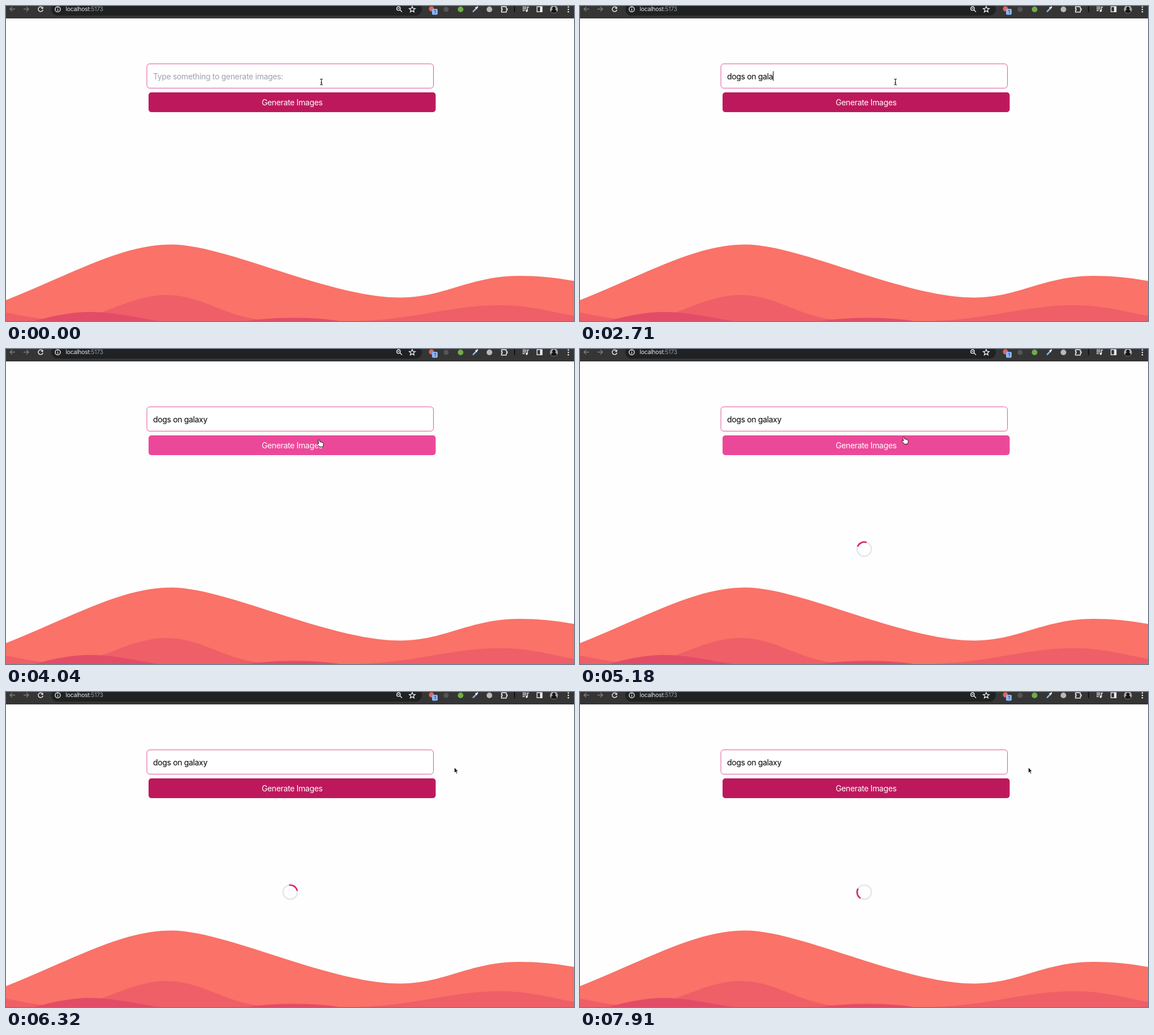
An HTML page for the animation above (8 s loop, 1004 by 558 pixels).

```html
<!DOCTYPE html>
<html lang="en">
<head>
<meta charset="utf-8">
<title>Image generator</title>
<style>
  html, body { margin: 0; width: 100%; height: 100%; overflow: hidden; background: #fefefe; }
  svg { display: block; width: 100%; height: 100%; }
  text { font: 14px Inter, "Liberation Sans", sans-serif; letter-spacing: -.34px; white-space: pre; }
  .url { font-size: 10.4px; letter-spacing: -.26px; }
  .line { fill: none; stroke: #e8eaed; stroke-width: 1.4; }
  .dim { stroke: #7c7c7c; }
</style>
</head>
<body>
<svg viewBox="0 0 1004 558">
  <rect width="1004" height="558" fill="#fefefe"/>

  <!-- browser toolbar -->
  <rect width="1004" height="22" fill="#353535"/>
  <rect x="80" y="-6" width="655" height="23" rx="11.5" fill="#202122"/>
  <path class="line dim" d="M16 5.5H7M11 1.5l-4 4 4 4M31 5.5h9M36 1.5l4 4-4 4"/>
  <path class="line" d="M64.6 3.2A4.2 4.2 0 1 0 65.3 6.5"/>
  <path d="M65.6 1v4h-4z" fill="#e8eaed"/>
  <circle class="line" cx="91.5" cy="5.8" r="4.6" stroke-width="1.2"/>
  <path class="line" d="M91.5 5.2v3.2M91.5 2.8v1.3"/>
  <text class="url" x="105.5" y="9.4" fill="#e8eaed">localhost<tspan fill="#9aa0a6">:5173</tspan></text>
  <circle class="line" cx="693.8" cy="4.4" r="3.2"/>
  <path class="line" d="M696.2 6.8l3.8 3.8M692.2 4.4h3.2"/>
  <path class="line" d="M718 .8l1.5 3.4 3.7.3-2.8 2.4.9 3.6-3.3-1.9-3.3 1.9.9-3.6-2.8-2.4 3.7-.3z" stroke-width="1.2"/>
  <circle cx="752" cy="5" r="4.5" fill="#e0645c"/>
  <rect x="753" y="5" width="10" height="10.5" rx="2" fill="#8ab4f8"/>
  <text x="758.2" y="13.4" text-anchor="middle" fill="#202124" style="font-size:8px">1</text>
  <circle cx="778" cy="6" r="4.5" fill="#555"/>
  <circle cx="803.5" cy="6" r="5" fill="#70ad47"/>
  <path d="M824.5 11l.6-2.4 5-5 1.8 1.8-5 5z" fill="#8ab4f8"/>
  <path d="M829 2.8l1.2-1 .8.8 2-2.4 1.8 1.8-2.4 2 .8.8-1.2 1z" fill="#fff"/>
  <circle cx="854.5" cy="6" r="5" fill="#b9b9b9"/>
  <path class="line" d="M875.7 1.5h3.1v-1.5h2.6v1.5h3.1v3.2h1.5v2.6h-1.5v3.4h-8.8V7.5h1.4V4.7h-1.4z"/>
  <rect x="898" width="1.6" height="11" fill="#0c0c0c"/>
  <path class="line" d="M913 2h7M913 5h7M913 8h4M921.7 8.3V2h2.5"/>
  <circle cx="920.4" cy="8.5" r="1.9" fill="#e8eaed"/>
  <rect class="line" x="938.6" y="1.2" width="9" height="9"/>
  <path d="M944 1h4v9.5h-4z" fill="#e8eaed"/>
  <circle cx="968.5" cy="6" r="7" fill="#aaa"/>
  <path d="M963.5 10.5q0-3.5 3-4a3 3 0 1 1 4 0q3 .5 3 4-5 4-10 0" fill="#161616"/>
  <g fill="#e8eaed"><circle cx="994" cy="1.8" r="1.3"/><circle cx="994" cy="6" r="1.3"/><circle cx="994" cy="10.2" r="1.3"/></g>

  <!-- waves -->
  <path fill="#fa7268" d="M0 521C120 473 205 422.5 292 422.5C390 422.5 570 516.5 697 516.5C775 516.5 820 478 908 478C940 478 970 481 1004 487V558H0z"/>
  <path fill="#ef5f67" d="M0 543C30 549 60 556 95 556C170 556 215 512 284 512C345 512 385 549 450 556C520 561 600 560 660 556C740 549 800 530 872 530C925 530 960 541 1004 549V558H0z"/>
  <path fill="#e34c67" d="M50 558C90 547 120 542 148 542C190 542 225 551 270 558zM425 558C470 550.5 550 550.5 590 558z"/>

  <!-- form -->
  <rect x="249" y="102.5" width="506.5" height="43" rx="5" fill="#fff" stroke="#e0569a"/>
  <text id="entry" x="260" y="129.5"></text>
  <rect id="caret" y="115.5" width="1" height="17"/>
  <rect id="button" x="252" y="153" width="507.5" height="35" rx="5"/>
  <text x="505.7" y="175.6" text-anchor="middle" fill="#fff">Generate Images</text>

  <g id="spinner" fill="none" stroke-width="2.7">
    <circle cx="502.4" cy="354.6" r="12.6" stroke="#e5e7eb"/>
    <circle id="arc" cx="502.4" cy="354.6" r="12.6" stroke="#db2777" pathLength="360" stroke-dasharray="88 272"/>
  </g>

  <!-- pointers, each with its hotspot at 0,0 -->
  <path id="beam" fill="none" stroke="#222" stroke-width="1.1" d="M-2.5-5.2Q0-5.2 0-3.5Q0-5.2 2.5-5.2M0-4V4M-2.5 5.2Q0 5.2 0 3.5Q0 5.2 2.5 5.2M-1.5 1.5h3"/>
  <path id="hand" fill="#fff" stroke="#111" stroke-width="1" d="M-1.2 1C-.8-.6 1-.6 1.4 1L2.2 4C3 3.2 4.3 3.5 4.5 4.4C5.5 3.8 6.5 4.3 6.6 5.2C7.6 5 8.2 5.6 8.2 6.6C8.3 9 7.6 10 7 12.4H1C0 10.3-1.5 9-3 7.4C-3.2 6-1.6 5.8-.2 7z"/>
  <path id="arrow" fill="#111" stroke="#fff" stroke-width=".7" d="M-.4-.5V9.2L1.8 7.2L3.4 11L5 10.3L3.4 6.7H6.2z"/>
</svg>
<script>
const LOOP = 8000, TICK = 87.72, TICK_ORIGIN = 4302, SPIN_PER_TICK = 32.3;
const PROMPT = "dogs on galaxy";
// [ms, letters typed]
const KEYS = [[750, 1], [840, 2], [1190, 3], [1280, 4], [1640, 5], [1820, 6], [2000, 7],
              [2180, 8], [2440, 10], [2710, 12], [3160, 13], [3330, 14]];
// [tick, x, y]
const PATH = [[-5, 557.5, 134.5], [-4, 556, 148], [-3, 553, 161], [-2, 552, 162], [9, 552, 162],
              [10, 572, 156], [11, 628, 149], [12, 700, 141], [13, 755, 136], [14, 793, 134]];

const $ = id => document.getElementById(id);
const show = (id, on) => $(id).setAttribute("visibility", on ? "visible" : "hidden");
const between = (v, a, b) => v >= a && v < b;

function pointerAt(tick) {
  const next = PATH.findIndex(p => p[0] > tick);
  if (next < 0) return PATH.at(-1).slice(1);
  if (next === 0) return PATH[0].slice(1);
  const [a, b] = [PATH[next - 1], PATH[next]];
  const f = (tick - a[0]) / (b[0] - a[0]);
  return [1, 2].map(i => a[i] + (b[i] - a[i]) * f);
}

function drawEntry(t) {
  const typed = KEYS.reduce((n, [at, count]) => t >= at ? count : n, 0);
  const entry = $("entry");
  entry.textContent = typed ? PROMPT.slice(0, typed) : "Type something to generate images:";
  entry.setAttribute("fill", typed ? "#000" : "#9ca3af");
  const width = typed ? entry.getComputedTextLength() : 0;
  $("caret").setAttribute("x", Math.round(260 + width));
  show("caret", between(t, 570, 3870) || between(t, 4310, 4400));
}

function drawPointer(tick) {
  const [x, y] = pointerAt(tick);
  const hover = between(x, 252, 760) && between(y, 153, 188);
  const inField = between(x, 249, 756) && between(y, 102, 146);
  const kind = hover ? "hand" : inField ? "beam" : "arrow";
  for (const id of ["beam", "hand", "arrow"]) show(id, id === kind);
  $(kind).setAttribute("transform", `translate(${x} ${y})`);
  $("button").setAttribute("fill", hover ? "#ec4899" : "#be185d");
}

function draw(now) {
  const t = now % LOOP;
  const tick = Math.floor((t - TICK_ORIGIN) / TICK);
  drawEntry(t);
  drawPointer(tick);
  show("spinner", tick >= 1);
  const angle = -25 + SPIN_PER_TICK * (tick - 10);
  $("arc").setAttribute("transform", `rotate(${angle - 134} 502.4 354.6)`);
}

let start;
function loop(now) {
  start ??= now;
  draw(now - start);
  requestAnimationFrame(loop);
}
draw(0);
requestAnimationFrame(loop);
</script>
</body>
</html>
```
